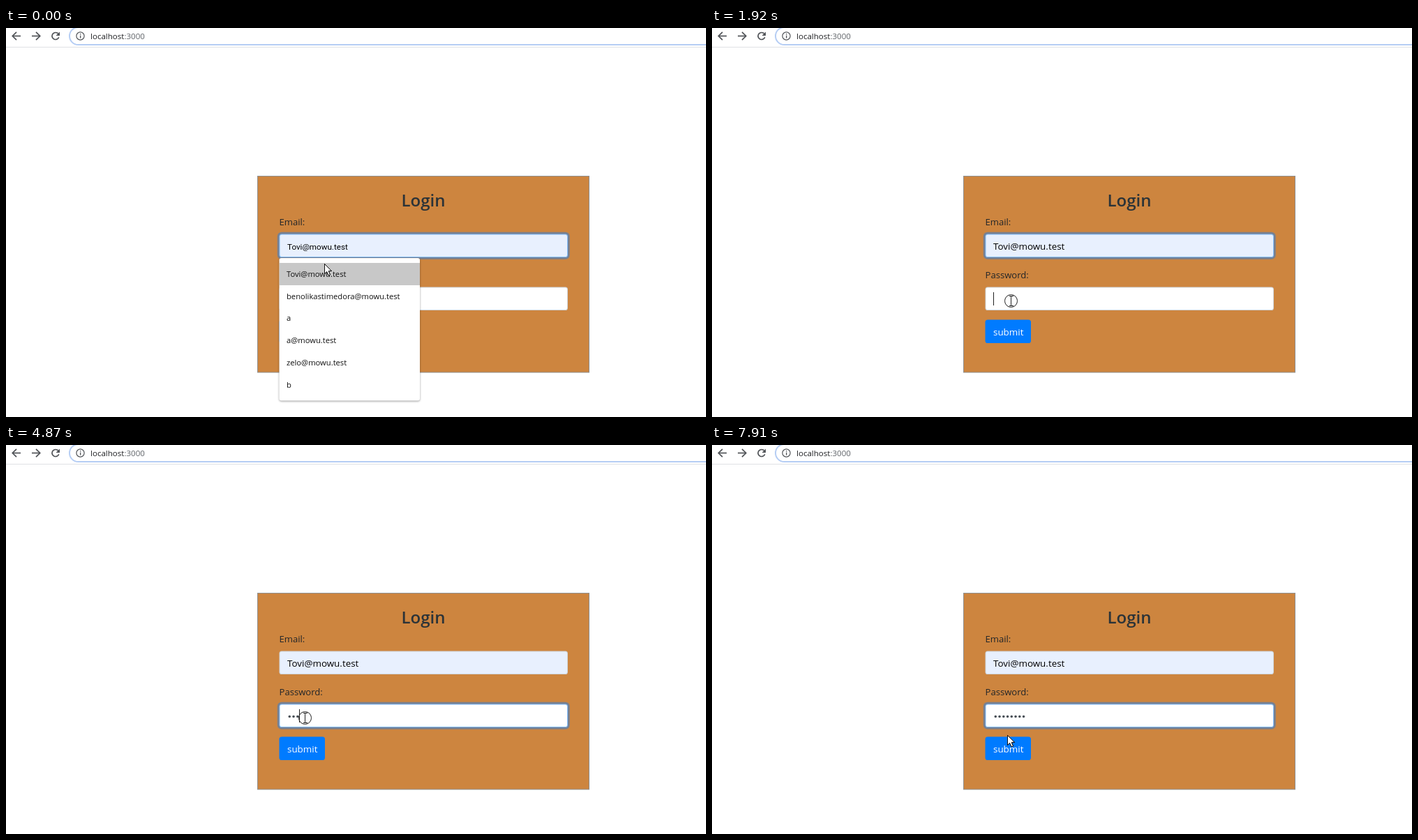
Write an HTML page with a canvas that moves like this. It is 1003 px wide and 558 px high and loops after 8000 ms.

```html
<!DOCTYPE html>
<html lang="en">
<head>
<meta charset="utf-8">
<title>Login form</title>
<style>
  html, body { margin: 0; width: 100%; height: 100%; overflow: hidden; background: #fff; }
  canvas { display: block; }
</style>
</head>
<body>
<canvas id="stage" width="1003" height="558"></canvas>
<script>
const ctx = document.getElementById('stage').getContext('2d');
const LOOP = 8000;
const SANS = '"Open Sans", "Noto Sans", sans-serif';
const INK = '#212529';
const EMAIL = 'Tovi@mowu.test';
const OPTIONS = [EMAIL, 'benolikastimedora@mowu.test', 'a', 'a@mowu.test', 'zelo@mowu.test', 'b'];

const T = {
  pick: 790, filled: 910, caretOff: 1490, click: 1920, focus: 2070, leave: 7780, end: 7910
};
const KEYS = [2940, 4120, 4870, 5310, 6030, 6480, 6920, 7350];

// Pointer stops: start time, kind, x, y
const POINTER = [
  [0, 'arrow', 456, 338],
  [130, 'arrow', 453, 342],
  [340, 'arrow', 447, 352],
  [490, 'arrow', 446, 353],
  [910, 'arrow', 435, 356],
  [1060, 'arrow', 434, 356],
  [1210, 'arrow', 429, 365],
  [1340, 'beam', 429, 385],
  [1490, 'beam', 429, 389],
  [1640, 'beam', 429, 391],
  [7780, 'arrow', 427, 403],
  [7910, 'arrow', 423, 416]
];

function text(str, x, y, size, color = INK, opts = {}) {
  ctx.font = `${opts.weight || 400} ${size}px ${opts.family || SANS}`;
  ctx.textAlign = opts.align || 'left';
  ctx.fillStyle = color;
  ctx.fillText(str, x, y);
  return ctx.measureText(str).width;
}

function box(x, y, w, h, r, fill) {
  ctx.beginPath();
  ctx.roundRect(x, y, w, h, r);
  ctx.fillStyle = fill;
  ctx.fill();
}

function line(points, color, width = 1, close = false) {
  ctx.beginPath();
  points.forEach(([x, y]) => ctx.lineTo(x, y));
  if (close) ctx.closePath();
  ctx.strokeStyle = color;
  ctx.lineWidth = width;
  ctx.stroke();
}

function ring(x, y, r, color, width = 1, from = 0, to = Math.PI * 2) {
  ctx.beginPath();
  ctx.arc(x, y, r, from, to);
  ctx.strokeStyle = color;
  ctx.lineWidth = width;
  ctx.stroke();
}

function caret(x, y) {
  ctx.fillStyle = '#222';
  ctx.fillRect(Math.round(x), y, 1, 19);
}

function navArrow(x, y, dir) {
  const color = '#505357';
  line([[x - 6 * dir, y], [x + 6 * dir, y]], color, 1.7);
  line([[x, y - 5.7], [x + 5.7 * dir, y], [x, y + 5.7]], color, 1.7);
}

function toolbar() {
  navArrow(15, 11.5, -1);
  navArrow(43, 11.5, 1);

  ring(71, 11.5, 5, '#505357', 1.7, 0.35, Math.PI * 1.75);
  ctx.beginPath();
  ctx.moveTo(77, 5.5);
  ctx.lineTo(77, 11);
  ctx.lineTo(71.5, 11);
  ctx.fillStyle = '#505357';
  ctx.fill();

  ctx.beginPath();
  ctx.roundRect(91, -1, 960, 25, 12.5);
  ctx.strokeStyle = '#b5cdf4';
  ctx.lineWidth = 2;
  ctx.stroke();

  ring(106.5, 11.5, 5.6, '#505357', 1.2);
  ctx.fillStyle = '#505357';
  ctx.fillRect(106, 8, 1.3, 1.4);
  ctx.fillRect(106, 10.6, 1.3, 4);

  const host = text('localhost', 121, 16, 11.55, '#202124');
  text(':3000', 121 + host, 16, 11.55, '#5f6368');
  ctx.fillStyle = '#dfe1e5';
  ctx.fillRect(0, 27, 1003, 1);
}

function field(y, fill, focused) {
  const x = 391.5, w = 413.5, h = 33.5;
  if (focused) box(x - 2.7, y - 2.7, w + 5.4, h + 5.4, 6, 'rgba(0,123,255,.42)');
  box(x, y, w, h, 3.6, focused ? '#80bdff' : '#ced4da');
  box(x + 1, y + 1, w - 2, h - 2, 2.8, fill);
}

function squiggle() {
  const points = [];
  for (let x = 403; x <= 428; x += 1.5) points.push([x, 320.7 + points.length % 2 * 1.4]);
  line(points, '#e33', 1);
}

function dropdown() {
  ctx.save();
  ctx.shadowColor = 'rgba(0,0,0,.4)';
  ctx.shadowBlur = 3;
  ctx.shadowOffsetY = 1;
  box(391.5, 330, 201.5, 204.5, 3, '#fff');
  ctx.restore();
  ctx.fillStyle = '#c8c8c8';
  ctx.fillRect(392, 337, 201, 32);
  OPTIONS.forEach((name, i) => text(name, 402, 357 + i * 31.7, 11.2, '#111', { weight: 500 }));
}

function form(t) {
  const choosing = t < T.filled;
  ctx.fillStyle = '#909090';
  ctx.fillRect(360, 212, 476, 282.5);
  ctx.fillStyle = '#cd853f';
  ctx.fillRect(361, 213, 474, 280.5);

  text('Login', 598, 256, 24, '#2b3338', { weight: 600, align: 'center' });
  text('Email:', 391.5, 283, 13.1);
  text('Password:', 391.5, 359, 13.1);

  field(295.5, '#e8f0fe', t < T.focus);
  field(371.5, '#fff', t >= T.focus);
  box(391.5, 418.5, 65.5, 33.5, 3.6, '#007bff');
  text('submit', 403, 441, 13.4, '#fff');

  if (choosing) {
    text(EMAIL, 403, 318, 11.65, '#000', { family: 'Roboto, sans-serif' });
    if (t >= 340) caret(403, 303);
    dropdown();
    return;
  }
  const width = text(EMAIL, 403, 318, 13.4, '#000');
  if (t < T.caretOff) caret(403 + width, 303);
  if (t < T.click) squiggle();
}

function password(t) {
  const typed = KEYS.filter(k => k <= t).length;
  const pitch = 5.75;
  ctx.fillStyle = '#495057';
  for (let i = 0; i < typed; i++) {
    ctx.beginPath();
    ctx.arc(403.4 + (i + 0.5) * pitch, 389.5, 1.75, 0, Math.PI * 2);
    ctx.fill();
  }
  if (t >= T.click && t < T.end) caret(403 + typed * pitch, 379);
}

function arrow(x, y) {
  const shape = [[0, 0], [0, 14], [3.2, 11], [5.6, 16.4], [8, 15.4], [5.7, 10.2], [10, 10]];
  ctx.save();
  ctx.translate(x + 0.5, y + 0.5);
  ctx.lineJoin = 'round';
  line(shape, '#000', 1, true);
  ctx.fillStyle = '#fff';
  ctx.fill();
  line(shape, '#111', 1, true);
  ctx.restore();
}

function beam(x, y) {
  const top = y - 7, bottom = y + 7;
  line([[x - 3, top + .5], [x + 3, top + .5]], '#222');
  line([[x - 3, bottom + .5], [x + 3, bottom + .5]], '#222');
  line([[x - .5, top], [x - .5, bottom]], '#222');
}

function pointer(t) {
  const [, kind, x, y] = POINTER.filter(p => p[0] <= t).pop();
  const picking = t >= T.pick && t < T.filled;
  const clicking = t >= T.click && t < T.leave;
  if (picking) ring(x + 1.5, y + 1.5, 9, '#222');
  if (clicking) ring(x - .5, y + .5, 9, '#222');
  (kind === 'arrow' ? arrow : beam)(x, y);
}

function draw(t) {
  ctx.fillStyle = '#fff';
  ctx.fillRect(0, 0, 1003, 558);
  toolbar();
  form(t);
  password(t);
  pointer(t);
}

const start = performance.now();
function tick() {
  draw((performance.now() - start) % LOOP);
  requestAnimationFrame(tick);
}
tick();
</script>
</body>
</html>
```
